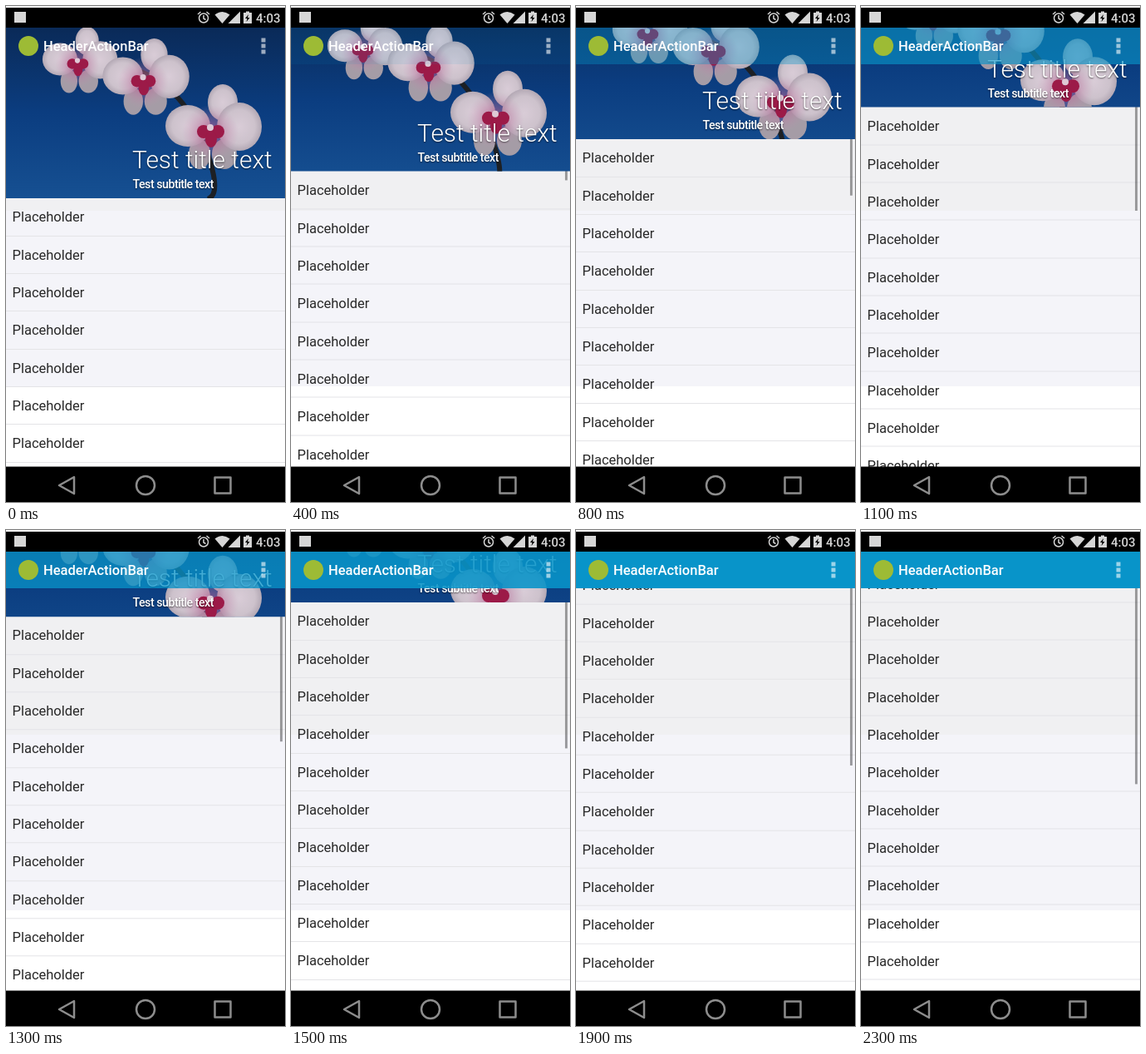
An HTML page that plays this animation: 336x596 px, repeating every 2400 ms.

```html
<!DOCTYPE html>
<html lang="en">
<head>
<meta charset="utf-8">
<title>Fading header list</title>
<style>
  @property --s { syntax: '<number>'; inherits: true; initial-value: 0; }

  html, body { margin: 0; width: 100%; height: 100%; overflow: hidden; background: #000; }

  /* --s is the scroll distance in px; everything else follows from it */
  #stage {
    position: relative; width: 336px; height: 596px; overflow: hidden;
    font-family: Roboto, "Noto Sans", sans-serif;
    background: linear-gradient(#f0f0f2 246px, #f4f4f9 246px, #f4f4f9 457px, #fff 457px);
    animation: scroll 2400ms infinite;
  }
  @keyframes scroll {
    0%     { --s: 0;     animation-timing-function: steps(1); }
    12.49% { --s: 16;    animation-timing-function: steps(1); }
    16.66% { --s: 32.5;  animation-timing-function: steps(4); }
    33.32% { --s: 71;    animation-timing-function: steps(3); }
    45.82% { --s: 109.5; animation-timing-function: steps(4); }
    62.49% { --s: 144;   animation-timing-function: steps(4); }
    79.15% { --s: 187.3; animation-timing-function: steps(4); }
    95.82%, 100% { --s: 234.5; animation-timing-function: steps(1); }
  }

  #stage > *, #header > * { position: absolute; left: 0; }

  #list {
    top: 231.4px; width: 336px;
    transform: translateY(calc(var(--s) * -1px));
  }
  .item {
    box-sizing: border-box; height: 45.33px; padding-left: 7.5px;
    font-size: 16.5px; line-height: 46.5px; color: #282828;
    border-bottom: 1px solid #e4e4e7;
  }
  #stage > #thumb {
    left: 330px; top: -106.5px; width: 3px; height: 300px;
    background: rgba(0, 0, 0, .36);
    transform: translateY(calc(var(--s) * .475px));
  }

  #header {
    top: 26px; width: 336px; height: 205px; overflow: hidden;
    transform: translateY(calc(var(--s) * -1px));
  }
  #photo { top: 0; transform: translateY(calc(var(--s) * .5px)); }
  #header > .title, #header > .sub {
    left: 152px; color: #fff; white-space: nowrap;
    text-shadow: 0 1px 2px rgba(0, 0, 0, .6);
  }
  #header > .title { top: 143.5px; font: 300 29.9px/30px Roboto, "Noto Sans", sans-serif; }
  #header > .sub {
    left: 152.5px; top: 179.5px;
    font-size: 14.2px; font-weight: 500; line-height: 16px; letter-spacing: -.5px;
  }

  #bar {
    top: 25px; width: 336px; height: 45px; background: #0894c9;
    opacity: calc((var(--s) - 20) / 140);
  }
  #stage > #name {
    left: 45px; top: 38px; color: #fff; white-space: nowrap;
    font-size: 16.5px; font-weight: 500; line-height: 21px;
  }
  #chrome { top: 0; }
</style>
</head>
<body>
<div id="stage">
  <div id="list"></div>
  <div id="thumb"></div>

  <div id="header">
    <svg id="photo" width="336" height="205" viewBox="0 26 336 205">
      <defs>
        <linearGradient id="sky" x2="0" y2="1">
          <stop offset="0" stop-color="#0a2a58"/>
          <stop offset=".5" stop-color="#0b3d80"/>
          <stop offset="1" stop-color="#165092"/>
        </linearGradient>
        <radialGradient id="petal">
          <stop offset="0" stop-color="#d9ccd7"/>
          <stop offset=".7" stop-color="#cdc2cc"/>
          <stop offset="1" stop-color="#b3a8b4"/>
        </radialGradient>
        <radialGradient id="blush">
          <stop offset="0" stop-color="#b8508a" stop-opacity=".8"/>
          <stop offset="1" stop-color="#c890b4" stop-opacity="0"/>
        </radialGradient>
        <g id="flower">
          <g fill="#a59ca6">
            <ellipse cx="-13" cy="25" rx="13" ry="18"/>
            <ellipse cx="17" cy="25" rx="15" ry="18"/>
          </g>
          <g fill="url(#petal)">
            <ellipse cx="15" cy="-37" rx="18" ry="22"/>
            <ellipse cx="-27" cy="-9" rx="27" ry="25"/>
            <ellipse cx="35" cy="-8" rx="27" ry="29"/>
          </g>
          <circle r="34" fill="url(#blush)"/>
          <g fill="#9c1a48">
            <ellipse cx="-8" cy="-2" rx="8" ry="8"/>
            <ellipse cx="9" cy="-2" rx="8" ry="8"/>
            <ellipse cx="1" cy="7" rx="7" ry="10"/>
          </g>
          <circle cy="-7" r="4" fill="#dfc9d6"/>
        </g>
      </defs>
      <rect y="26" width="336" height="205" fill="url(#sky)"/>
      <path d="M110 66Q200 75 232 150T243 232" fill="none" stroke="#1d2024" stroke-width="6"/>
      <use href="#flower" transform="translate(86 71) scale(.78)"/>
      <use href="#flower" transform="translate(165 92) scale(.9)"/>
      <use href="#flower" transform="translate(246 153)"/>
    </svg>
    <div class="title">Test title text</div>
    <div class="sub">Test subtitle text</div>
  </div>

  <div id="bar"></div>
  <div id="name">HeaderActionBar</div>

  <svg id="chrome" width="336" height="596">
    <path d="M0 0H336V26H0ZM0 553.500H336V596H0Z"/>
    <rect width="336" height="2" fill="#fff"/>
    <circle cx="27" cy="48" r="12" fill="#9dbb35"/>
    <path d="M310 38.5v19" stroke="#fff" stroke-opacity=".6" stroke-width="5" stroke-dasharray="5 2"/>

    <g fill="#d6d6d6">
      <rect x="10" y="7" width="14" height="13"/>
      <path d="M251.500 10.500Q260.500 3.500 269.500 10.500L260.500 21Z"/>
      <path d="M282 6.500V21H267.500Z"/>
      <path d="M289 6.500h4v1.500h3V21H286V8h3Z"/>
      <text x="301" y="19.500" font-size="15" font-weight="500">4:03</text>
    </g>
    <path d="M292 10l-4 5h2.500l-1 4 4-5h-2.500Z"/>
    <g fill="none" stroke="#d6d6d6" stroke-width="1.500">
      <circle cx="238" cy="14.500" r="5.500"/>
      <path d="M238 11v4l2.500 1.500M231 10l3.500-3M245 10l-3.500-3"/>
    </g>

    <g fill="none" stroke="#8d8d8d" stroke-width="2.500" stroke-linejoin="round">
      <path d="M82 566V586L64 576Z"/>
      <circle cx="168" cy="576" r="11"/>
      <rect x="251.500" y="566.500" width="19" height="19"/>
    </g>
  </svg>
</div>

<script>
  const list = document.getElementById('list');
  for (let i = 0; i < 13; i++) {
    const item = document.createElement('div');
    item.className = 'item';
    item.textContent = 'Placeholder';
    list.append(item);
  }
</script>
</body>
</html>
```
